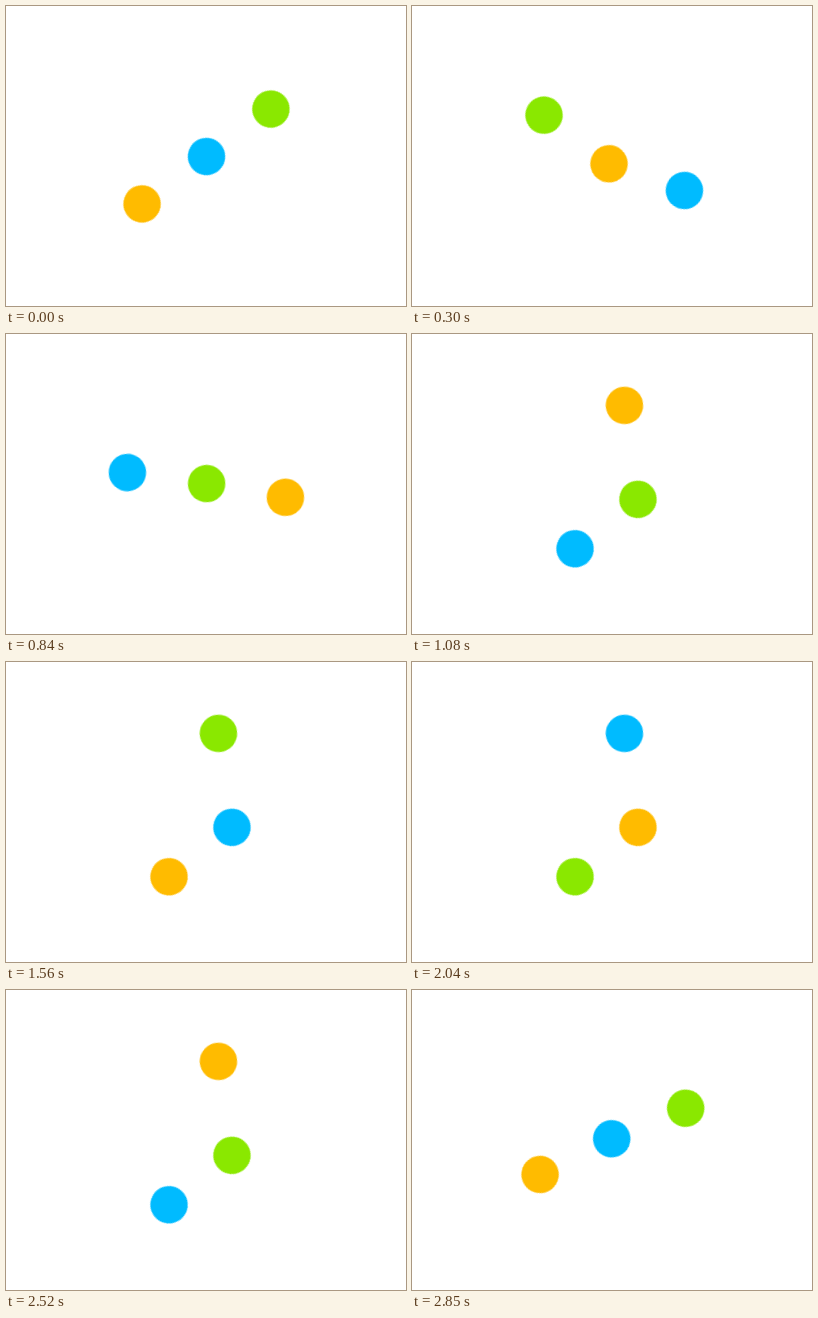
An HTML page for the animation above (2.88 s loop, 400 px wide and 300 px high).

```html
<!DOCTYPE html>
<html lang="en">
<head>
<meta charset="utf-8">
<title>Three dots</title>
<style>
  :root {
    --turn: 480ms;
    --orange: #ffbb00;
    --blue: #00bbff;
    --green: #8ae800;
  }
  html, body {
    margin: 0;
    width: 100%;
    height: 100%;
    overflow: hidden;
    background: #fff;
  }
  svg {
    display: block;
    width: 100%;
    height: 100%;
  }
  g { transform-origin: 0 0; }

  /* The row makes half a turn while the inner pair swaps places;
     the colours then move on by one, so every turn joins the next. */
  .row { animation: row var(--turn) linear infinite; }
  .pair { animation: swap var(--turn) cubic-bezier(.395, .04, .35, 1.2) infinite; }
  circle { animation: colour calc(var(--turn) * 3) step-end infinite; }
  .middle { animation-delay: calc(var(--turn) * -1); }
  .tail { animation-delay: calc(var(--turn) * -2); }

  @keyframes row {
    from { transform: rotate(-36deg); }
    to { transform: rotate(-216deg); }
  }
  @keyframes swap {
    from { transform: rotate(0deg); }
    to { transform: rotate(180deg); }
  }
  @keyframes colour {
    0% { fill: var(--green); }
    33.3333% { fill: var(--blue); }
    66.6667% { fill: var(--orange); }
    100% { fill: var(--green); }
  }
</style>
</head>
<body>
<svg viewBox="0 0 400 300">
  <g transform="translate(200.5 150.5)">
    <g class="row">
      <circle class="head" cx="80" r="18.7"/>
      <g transform="translate(-40 0)">
        <g class="pair">
          <circle class="middle" cx="40" r="18.7"/>
          <circle class="tail" cx="-40" r="18.7"/>
        </g>
      </g>
    </g>
  </g>
</svg>
</body>
</html>
```
